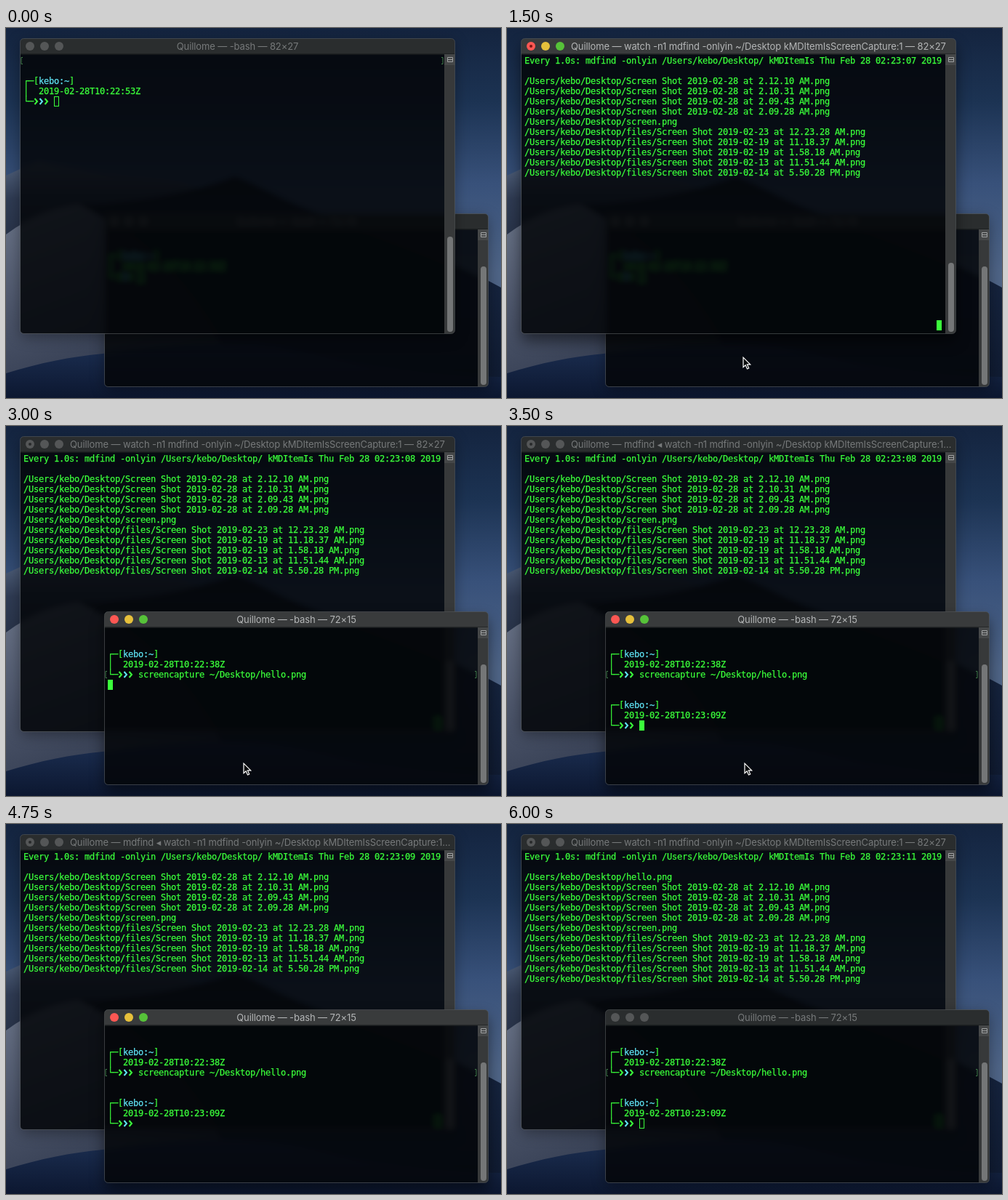
Recreate the animation shown at these times as an HTML page. Size 681x509 px, loop 7 s.

```html
<!DOCTYPE html>
<html lang="en">
<head>
<meta charset="utf-8">
<title>Watching screen captures</title>
<style>
  html, body { margin: 0; width: 100%; height: 100%; overflow: hidden; background: #14233d; }
  svg { display: block; width: 681px; height: 509px; }
  text { white-space: pre; }
  .mono { font: 12px "DejaVu Sans Mono", monospace; letter-spacing: -.2246px; stroke-width: .25px; }
  .bar { font: 13px Inter, sans-serif; letter-spacing: -.115px; }
</style>
</head>
<body>
<svg viewBox="0 0 681 509" xmlns="http://www.w3.org/2000/svg">
  <defs>
    <linearGradient id="sky" x2="0" y2="1">
      <stop offset="0" stop-color="#14243f"/><stop offset=".2" stop-color="#1c3353"/>
      <stop offset=".42" stop-color="#38517a"/><stop offset=".66" stop-color="#4f6587"/>
    </linearGradient>
    <linearGradient id="far" x2="0" y2="1">
      <stop offset="0" stop-color="#53647f"/><stop offset=".35" stop-color="#2f3b53"/><stop offset="1" stop-color="#222c40"/>
    </linearGradient>
    <linearGradient id="lit" x2=".5" y2="1">
      <stop offset="0" stop-color="#6b7589"/><stop offset=".45" stop-color="#4c556a"/><stop offset="1" stop-color="#2b3448"/>
    </linearGradient>
    <linearGradient id="shade" x2="0" y2="1">
      <stop offset="0" stop-color="#10161f"/><stop offset=".5" stop-color="#15233d"/><stop offset="1" stop-color="#0f1a30"/>
    </linearGradient>
    <linearGradient id="near" x2="0" y2="1">
      <stop offset="0" stop-color="#1c2f52"/><stop offset="1" stop-color="#0c1730"/>
    </linearGradient>
    <filter id="glass"><feGaussianBlur stdDeviation="3.5"/></filter>
    <filter id="soft" x="-20%" y="-20%" width="140%" height="150%"><feGaussianBlur stdDeviation="10"/></filter>
  </defs>
  <g id="wall">
    <path d="M0 0H681V509H0z" fill="url(#sky)"/>
    <path d="M0 203Q22 192 45 184C90 194 140 204 200 207Q280 212 340 260V330H0z" fill="url(#far)"/>
    <path d="M0 284Q45 250 100 243L330 250 350 509H0z" fill="url(#lit)"/>
    <path d="M100 243C180 240 255 226 315 203C350 216 380 236 420 250C510 284 600 312 681 357V509H330C290 400 210 300 100 243z" fill="url(#shade)"/>
    <path d="M0 475C45 461 90 452 133 448C230 434 330 428 410 446C510 470 600 478 681 480V509H0z" fill="url(#near)"/>
  </g>
  <g id="stage"></g>
</svg>
<script>
const LOOP = 7000, STEP = 250, COL = 7, ROW = 14;
const GREEN = '#3bff3b', CYAN = '#5fe3f4';
const APP = 'Quillome', USER = 'kebo';
const stage = document.getElementById('stage');

const WATCH = 'watch -n1 mdfind -onlyin ~/Desktop/ kMDItemIsScreenCapture:1 ';
const SHOT = 'screencapture ~/Desktop/hello.png';
const WATCH_TITLE = 'watch -n1 mdfind -onlyin ~/Desktop kMDItemIsScreenCapture:1';
const FILES = [
  'Screen Shot 2019-02-28 at 2.12.10 AM', 'Screen Shot 2019-02-28 at 2.10.31 AM',
  'Screen Shot 2019-02-28 at 2.09.43 AM', 'Screen Shot 2019-02-28 at 2.09.28 AM', 'screen',
  'files/Screen Shot 2019-02-23 at 12.23.28 AM', 'files/Screen Shot 2019-02-19 at 11.18.37 AM',
  'files/Screen Shot 2019-02-19 at 1.58.18 AM', 'files/Screen Shot 2019-02-13 at 11.51.44 AM',
  'files/Screen Shot 2019-02-14 at 5.50.28 PM'
];

const BIG = { id: 'big', x: 19.5, y: 14.5, w: 598, h: 406 };
const SMALL = { id: 'small', x: 135.5, y: 255.5, w: 528, h: 238 };

// Last value whose start time has been reached.
const at = (t, keys) => keys.reduce((v, [from, next]) => t >= from ? next : v, null);

const rect = (x, y, w, h, fill, more = '') =>
  `<rect x="${x}" y="${y}" width="${w}" height="${h}" fill="${fill}" ${more}/>`;
const line = (d, color, width = 1) =>
  `<path d="${d}" fill="none" stroke="${color}" stroke-width="${width}"/>`;

const cellX = (win, col) => win.x + 4.5 + col * COL;
const cellY = (win, row) => win.y + 23.5 + row * ROW;
const print = (win, col, row, str, color = GREEN) =>
  `<text class="mono" x="${cellX(win, col)}" y="${cellY(win, row) + 11}" fill="${color}" stroke="${color}">${str}</text>`;

function caret(win, col, row, mode) {
  const x = cellX(win, col), y = cellY(win, row);
  if (mode === 'full') return rect(x, y, 7, 14, GREEN);
  if (mode === 'hollow') return rect(x + .5, y + .5, 6, 13, 'none', `stroke="${GREEN}"`);
  return '';
}

function prompt(win, row, stamp, command = '') {
  const x = cellX(win, 0), y = cellY(win, row);
  const arrows = [GREEN, CYAN, GREEN].map((color, i) =>
    line(`M${x + 15.5 + i * COL} ${y + 31}l3.5 4-3.5 4`, color, 2)).join('');
  return print(win, 0, row, '┌─[') + print(win, 0, row + 1, '│') + print(win, 0, row + 2, '└─') + arrows +
    print(win, 3, row, USER + ':~', CYAN) + print(win, 9, row, ']') +
    print(win, 3, row + 1, stamp) + print(win, 6, row + 2, command);
}

function marks(win, row) {
  const y = cellY(win, row) + 2.5, left = win.x + 1.5, right = win.x + win.w - 16.5;
  return line(`M${left + 2} ${y}h-2v9h2M${right - 2} ${y}h2v9h-2`, '#3f7a48');
}

function scrollbar(win, thumb) {
  const x = win.x + win.w - 14.5, top = win.y + 21.5, end = win.y + win.h;
  return rect(x, top, 14.5, end - top, '#37393a') + rect(x, top, 14.5, 15, '#454748') +
    line(`M${x + 4.5} ${top + 4.5}h7v6h-7zM${x + 4.5} ${top + 7.5}h7`, '#a0a2a3') +
    rect(x + 4, thumb, 8, end - 2.5 - thumb, '#747677', 'rx="4"');
}

function titlebar(win, s) {
  const y = win.y + 10.5;
  const lights = (s.active ? s.lights : Array(3).fill('#545657')).map((color, i) =>
    `<circle cx="${win.x + 13.5 + 20 * i}" cy="${y}" r="6" fill="${color}"/>`).join('');
  const dot = s.busy ? `<circle cx="${win.x + 13.5}" cy="${y}" r="2" fill="${s.active ? '#7c1512' : '#282a2b'}"/>` : '';
  const place = s.wide ? `x="${win.x + 68.5}"` : `x="${win.x + win.w / 2}" text-anchor="middle"`;
  return rect(win.x, win.y, win.w, 22, s.active ? '#393b3c' : '#2a2d2e') +
    line(`M${win.x} ${win.y + 21.5}h${win.w}`, '#111416') + lights + dot +
    `<text class="bar" ${place} y="${y + 5}" fill="${s.active ? '#b4b6b7' : '#76797a'}">${APP} — ${s.title}</text>`;
}

function frame(win, s, under) {
  const clip = win.id + 'Clip';
  const box = (fill, more = '') => rect(win.x, win.y, win.w, win.h, fill, 'rx="5" ' + more);
  return `<clipPath id="${clip}">${box('#000')}</clipPath>` +
    `<g transform="translate(0 ${s.active ? 10 : 5})" opacity="${s.active ? .5 : .35}">${box('#000', 'filter="url(#soft)"')}</g>` +
    `<g clip-path="url(#${clip})"><g filter="url(#glass)"><use href="#wall"/>${under ? `<use href="#${under}"/>` : ''}</g>` +
    box('#04060a', 'fill-opacity=".87"') + titlebar(win, s) + s.body + scrollbar(win, s.thumb) + '</g>' +
    box('none', 'stroke="#5a5e60" stroke-opacity=".6"');
}

function bigState(t, lights) {
  const active = t >= 250 && t < 1750, running = t >= 1250;
  const mdfind = at(t, [[0, false], [1250, true], [1500, false], [3500, true], [3750, false], [4750, true], [5000, false]]);
  const mode = active ? 'full' : 'hollow';
  let title = '-bash — 82×27', body;
  if (!running) {
    const command = at(t, [[0, ''], [750, 'clear'], [1000, WATCH]]);
    body = marks(BIG, 0) + prompt(BIG, 2, '2019-02-28T10:22:53Z', command) + caret(BIG, 6 + command.length, 4, mode);
  } else {
    title = mdfind ? `mdfind ◂ ${WATCH_TITLE}…` : `${WATCH_TITLE} — 82×27`;
    if (t < 1500) body = caret(BIG, 0, 0, mode);
    else {
      const sec = at(t, [[0, '07'], [2500, '08'], [3750, '09'], [5000, '10'], [6000, '11']]);
      const files = t >= 5000 ? ['hello', ...FILES] : FILES;
      const home = `/Users/${USER}/Desktop/`;
      body = print(BIG, 0, 0, `Every 1.0s: mdfind -onlyin ${home} kMDItemIs Thu Feb 28 02:23:${sec} 2019`) +
        files.map((name, i) => print(BIG, 0, i + 2, `${home}${name}.png`)).join('') + caret(BIG, 81, 26, mode);
    }
  }
  return { active, lights, title, body, wide: running, busy: running, thumb: running ? 323 : 287 };
}

function smallState(t, lights) {
  const active = t >= 1750 && t < 5250, busy = t >= 3250 && t < 3500;
  const command = at(t, [[0, ''], [2500, 'clear'], [2750, SHOT]]);
  const mode = at(t, [[0, 'hollow'], [1750, 'full'], [4500, 'off'], [5000, 'full'], [5500, 'hollow']]);
  const [col, row] = at(t, [[0, [6 + command.length, 4]], [3000, [0, 5]], [3500, [6, 9]]]);
  const body = prompt(SMALL, 2, '2019-02-28T10:22:38Z', command) +
    (t >= 3000 ? marks(SMALL, 4) : '') +
    (t >= 3500 ? prompt(SMALL, 7, '2019-02-28T10:23:09Z') : '') + caret(SMALL, col, row, mode);
  return { active, lights, busy, body, title: `${busy ? SHOT : '-bash'} — 72×15`, thumb: 328 };
}

function pointer(t) {
  const spot = at(t, [[250, [306, 117]], [1500, [323, 452]], [1750, [325, 463]], [4000, [541, 438]], [4250, null]]);
  return spot ? `<path transform="translate(${spot})" d="M2 1.2V14.6L5.1 11.7 7.5 17 9.7 16 7.4 10.9H11.7z"
    fill="#080a0c" stroke="#fff" stroke-width="1.2" opacity="${t < 4000 ? 1 : .75}"/>` : '';
}

function draw(t) {
  const warm = t >= 4000 && t < 4250;
  const lights = warm ? ['#fb8c46', '#fb8c46', '#50cf35'] : ['#fc5753', '#e6c03b', '#56c239'];
  const wins = [[SMALL, smallState(t, lights)], [BIG, bigState(t, lights)]];
  if (t >= 1750) wins.reverse();
  const [back, front] = wins;
  stage.innerHTML = `<g id="back">${frame(...back)}</g>${frame(...front, 'back')}${pointer(t)}`;
}

let shown = -1;
function tick(now) {
  const step = Math.floor(now % LOOP / STEP);
  if (step !== shown) draw((shown = step) * STEP);
  requestAnimationFrame(tick);
}
draw(0);
requestAnimationFrame(tick);
</script>
</body>
</html>
```
